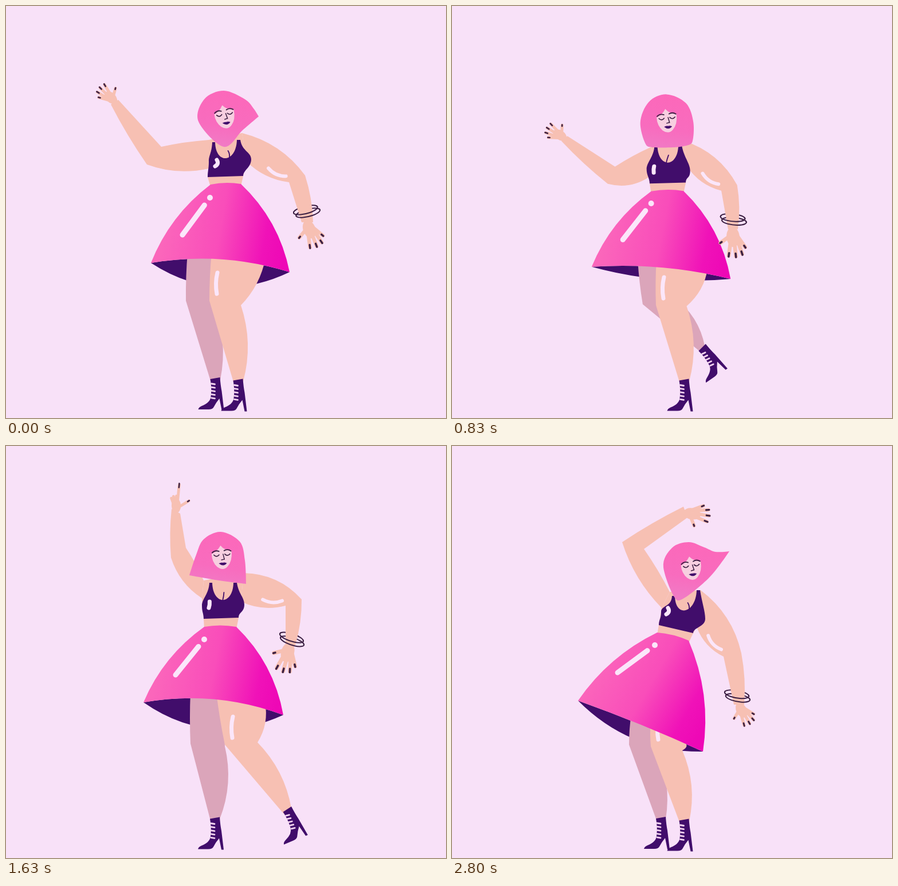
An HTML page with a canvas for the animation above (2.93 s loop, 768x720 px).

```html
<!DOCTYPE html>
<html lang="en">
<head>
<meta charset="utf-8">
<title>Dancer</title>
<style>
html, body { margin: 0; width: 100%; height: 100%; overflow: hidden; background: #f8e1f8; }
canvas { display: block; }
</style>
</head>
<body>
<canvas id="stage" width="768" height="720"></canvas>
<script>
const ctx = document.getElementById('stage').getContext('2d');
const LOOP = 2930, STEP = 100 / 3, LAST = 84;
const SKIN = '#f7c0b3', SHADE = '#dba5ba', DARK = '#410d6b', INK = '#3b1f42', SHINE = '#fbe6fa';

// Each row is one pose; poses are reached at these steps.
const keys = [0, 17, 34, 49, 62, 70, 83];

// waist L/R, hem L/R, hem bend, lining depth, shine start, shine dot
const skirtKeys = [
  [357,312, 410,311, 253,449, 495,465, 29, 68, 308,400, 356,335],
  [345,316, 400,315, 241,450, 484,468, 33, 48, 295,402, 344,338],
  [351,331, 409,331, 247,462, 489,486, 2, 0, 302,415, 352,352],
  [346,316, 402,316, 240,448, 484,470, 33, 70, 296,400, 346,338],
  [344,315, 399,313, 244,453, 488,463, 37, 72, 296,403, 344,338],
  [348,319, 402,323, 231,451, 466,498, 24, 58, 289,400, 346,341],
  [358,326, 413,340, 220,445, 438,534, 5, 50, 289,396, 354,348]];

// bottom L/R, strap L/R, bust L/R, facing
const topKeys = [
  [352,299, 414,297, 360,238, 409,234, 354,272, 428,268, 1],
  [340,303, 404,300, 348,236, 397,245, 331,276, 407,284, -1],
  [351,317, 413,317, 360,253, 406,241, 350,294, 426,290, .8],
  [345,302, 406,300, 355,239, 403,239, 342,279, 416,277, .2],
  [341,302, 402,299, 348,246, 394,236, 346,272, 416,268, 1],
  [346,306, 408,310, 361,240, 407,249, 339,282, 413,290, -1],
  [361,313, 421,327, 384,262, 433,252, 365,290, 442,302, 1]];

// Limbs: start, joint and end on one side, then end, joint and start on the other.
const armLeftKeys = [
  [354,284, 246,277, 183,172, 196,164, 271,246, 354,234],
  [336,296, 256,314, 182,236, 193,229, 275,284, 340,238],
  [352,301, 287,301, 213,235, 223,222, 299,271, 360,253],
  [342,266, 288,195, 289,110, 304,118, 314,178, 345,235],
  [340,268, 285,195, 280,92, 297,92, 307,160, 348,240],
  [345,266, 299,192, 324,85, 335,90, 333,165, 361,240],
  [366,283, 297,168, 404,106, 411,125, 335,180, 380,255]];
const armRightKeys = [
  [412,222, 522,296, 536,378, 516,378, 494,308, 420,272],
  [404,230, 496,316, 503,392, 486,392, 468,324, 402,272],
  [408,240, 502,305, 497,385, 480,385, 475,319, 420,290],
  [415,222, 516,268, 505,348, 488,348, 488,279, 410,272],
  [404,220, 525,268, 515,362, 496,362, 494,280, 411,272],
  [420,239, 506,322, 513,405, 496,405, 477,328, 410,290],
  [434,252, 505,362, 510,452, 492,452, 474,368, 427,316]];
const legBackKeys = [
  [375,430, 362,520, 374,653, 357,655, 314,515, 317,430],
  [375,430, 366,520, 378,653, 362,655, 316,513, 318,430],
  [395,465, 410,496, 515,527, 515,543, 352,531, 331,462],
  [380,430, 382,525, 373,652, 357,655, 322,520, 322,430],
  [380,430, 376,525, 373,652, 357,654, 317,515, 320,430],
  [380,450, 362,515, 371,642, 355,644, 305,505, 313,445],
  [365,480, 355,525, 373,652, 357,654, 309,522, 313,468]];
const legFrontKeys = [
  [453,440, 410,523, 414,656, 397,657, 355,515, 359,430],
  [452,444, 415,525, 414,656, 397,657, 361,520, 361,430],
  [440,474, 403,523, 414,656, 397,657, 350,525, 352,460],
  [452,448, 439,518, 498,633, 485,643, 382,522, 367,430],
  [452,448, 435,519, 480,615, 466,622, 375,520, 365,430],
  [442,480, 418,530, 413,656, 397,658, 370,525, 365,458],
  [403,515, 402,532, 414,656, 397,657, 347,525, 347,480]];

// left hand angle, size, pointing; right hand angle, size; bangles x, y, tilt
const handKeys = [
  [226, .78, 0, 70, .97, 525,359, -14],
  [222, .78, 0, 76, 1.08, 491,373, 6],
  [204, .74, 0, 97, .97, 492,373, 5],
  [269, .74, 1, 107, 1.03, 499,338, 18],
  [270, .82, 1, 104, .78, 507,343, 3],
  [283, .78, 1, 66, .84, 504,388, 4],
  [370, .9, 0, 62, .82, 498,437, 10]];

// back boot turn, front boot turn, front boot width
const bootKeys = [
  [0, 0, 1], [0, 0, 1], [-76, 0, 1], [0, -23, 1], [0, -19, 1], [0, 0, .6], [0, 0, 1]];

// nose x, y, tilt
const faceKeys = [
  [382,192, -8], [369,192, 0], [383,207, -8], [377,193, -2], [363,191, -10], [392,202, 10], [418,212, -6]];

// eight outline points clockwise from the crown, then roundness of the right and left lock
const hairKeys = [
  [380,148, 417,163, 432,179, 441,193, 413,217, 380,246, 336,202, 346,163, 0, 1],
  [368,148, 402,163, 415,195, 409,231, 378,250, 315,236, 320,200, 336,162, 1, 0],
  [382,162, 416,178, 429,210, 430,244, 405,241, 372,256, 339,210, 352,175, 0, 1],
  [375,150, 408,167, 417,200, 419,241, 372,235, 320,226, 332,190, 345,163, 0, 0],
  [363,150, 396,164, 406,195, 399,235, 352,244, 313,232, 320,190, 333,162, .3, 0],
  [394,156, 427,173, 437,205, 410,249, 364,244, 319,187, 344,185, 366,165, 1, 0],
  [413,168, 440,177, 460,185, 484,184, 447,232, 394,270, 369,212, 384,178, 0, .6]];

// Monotone cubic interpolation, so that held parts stay still.
function pose(rows, t) {
  t = Math.min(t, keys[keys.length - 1]);
  let i = 0;
  while (i < keys.length - 2 && t >= keys[i + 1]) i++;
  const span = keys[i + 1] - keys[i], u = (t - keys[i]) / span;
  return rows[i].map((a, c) => {
    const slope = j => rows[j + 1] && rows[j] ? (rows[j + 1][c] - rows[j][c]) / (keys[j + 1] - keys[j]) : 0;
    const tangent = j => {
      const p = slope(j - 1), q = slope(j);
      return p * q > 0 ? 2 * p * q / (p + q) : 0;
    };
    const b = rows[i + 1][c], e = u * u * (3 - 2 * u);
    return a + (b - a) * e + span * u * (1 - u) * ((1 - u) * tangent(i) - u * tangent(i + 1));
  });
}

const pairs = a => Array.from({ length: a.length >> 1 }, (_, i) => [a[2 * i], a[2 * i + 1]]);
const mix = (a, b, k) => [a[0] + (b[0] - a[0]) * k, a[1] + (b[1] - a[1]) * k];
const shift = (p, x, y) => [p[0] + x, p[1] + y];
const rad = deg => deg * Math.PI / 180;

function fill(color) { ctx.fillStyle = color; ctx.fill(); }

// Curve from a to b that bends to the left of its direction.
function bend(a, b, k) {
  const dx = b[0] - a[0], dy = b[1] - a[1], len = Math.hypot(dx, dy) || 1, m = mix(a, b, .5);
  ctx.quadraticCurveTo(m[0] + dy / len * k, m[1] - dx / len * k, ...b);
}

function begin(p) { ctx.beginPath(); ctx.moveTo(...p); }

function line(a, b, width, color, k = 0) {
  begin(a);
  bend(a, b, k);
  ctx.lineWidth = width;
  ctx.strokeStyle = color;
  ctx.stroke();
}

function limb(p, bends, color) {
  begin(p[0]);
  bend(p[0], p[1], bends[0]);
  bend(p[1], p[2], bends[1]);
  ctx.lineTo(...p[3]);
  bend(p[3], p[4], bends[2]);
  bend(p[4], p[5], bends[3]);
  fill(color);
}

function local(p, deg, sx, sy, draw) {
  ctx.save();
  ctx.translate(...p);
  ctx.rotate(rad(deg));
  ctx.scale(sx, sy);
  draw();
  ctx.restore();
}

const openHand = [[21,23], [44,11], [46,-1], [43,-12], [32,-18]];
const pointHand = [[24,31], [63,9], [36,2], [35,-5], [31,-10]];

function hand(p, deg, size, point) {
  local(p, deg, size, size, () => {
    ctx.beginPath();
    ctx.ellipse(13, 1, 17, 11, 0, 0, 7);
    fill(SKIN);
    openHand.forEach((open, i) => {
      const tip = mix(open, pointHand[i], point), root = [12, tip[1] * .35];
      line(root, tip, 6.5, SKIN);
      if (i < 2 || point < .5) line(mix(root, tip, .86), mix(root, tip, 1.05), 3.4, INK);
    });
  });
}

function boot(leg, deg, width) {
  local(shift(mix(leg[2], leg[3], .5), 0, -3), deg, width, 1, () => {
    ctx.fillStyle = DARK;
    ctx.fill(new Path2D('M-9 1L8-2Q9 12 11 22L15 55H11L7 35Q1 42-3 50Q-5 54-12 54H-30Q-29 50-24 48Q-9 42-8 32Q-6 17-9 1Z'));
    for (let y = 9; y < 36; y += 6.2) line([-7, y], [-1, y + 1], 2.8, '#f3d3ef');
  });
}

function bangles([x, y], tilt, from, to) {
  local([x, y], tilt, 1, 1, () => {
    ctx.strokeStyle = INK;
    ctx.lineWidth = 2;
    for (const s of [-1, 1]) {
      ctx.beginPath();
      ctx.ellipse(s * 1.5, s * 3, 21.5, 6.5, 0, from, to);
      ctx.stroke();
    }
  });
}

function hair(a) {
  const p = pairs(a.slice(0, 16)), n = p.length;
  const tangent = i => {
    const q = p[(i + 1) % n], r = p[(i + n - 1) % n];
    const k = (i === 3 ? a[16] : i === 5 ? a[17] : 1) / 6;
    return [(q[0] - r[0]) * k, (q[1] - r[1]) * k];
  };
  begin(p[0]);
  p.forEach((from, i) => {
    const j = (i + 1) % n, s = tangent(i), e = tangent(j);
    ctx.bezierCurveTo(...shift(from, ...s), ...shift(p[j], -e[0], -e[1]), ...p[j]);
  });
  const g = ctx.createLinearGradient(p[0][0], p[0][1], p[0][0] - 15, p[0][1] + 100);
  g.addColorStop(0, '#fc68ba');
  g.addColorStop(.6, '#f86cbe');
  g.addColorStop(1, '#f07cc6');
  fill(g);
}

function face([x, y, tilt]) {
  local([x, y], tilt, 1, 1, () => {
    ctx.fillStyle = '#f7cfe0';
    ctx.fill(new Path2D('M-2-19Q-8-9-18-5Q-18 9-9 18Q1 26 9 18Q18 9 17-9Q5-10-2-19Z'));
    line([-17, -7], [-5, -9], 1.8, INK, 4);
    line([4, -10], [16, -9], 1.8, INK, 4);
    line([-14, -3], [-5, -3], 1.7, INK, -5);
    line([5, -4], [14, -4], 1.7, INK, -5);
    line([2, -4], [4, 5], 1.5, INK);
    line([4, 5], [-1, 6], 1.5, INK);
    ctx.fillStyle = DARK;
    ctx.fill(new Path2D('M-6 12Q-2 10 1 11Q4 10 8 12Q2 19-6 12Z'));
  });
}

function draw(t) {
  const s = pose(skirtKeys, t), [wL, wR, hL, hR] = pairs(s.slice(0, 8));
  const top = pose(topKeys, t), [bL, bR, sL, sR, cL, cR] = pairs(top), facing = top[12];
  const [armL, armR, back, front] = [armLeftKeys, armRightKeys, legBackKeys, legFrontKeys].map(k => pairs(pose(k, t)));
  const h = pose(handKeys, t), bangle = [h[5], h[6]], boots = pose(bootKeys, t);

  ctx.fillStyle = '#f8e1f8';
  ctx.fillRect(0, 0, 768, 720);
  ctx.lineCap = 'round';

  // skirt lining and legs
  begin(hL);
  bend(hL, hR, s[8]);
  bend(hR, hL, s[9]);
  fill(DARK);
  limb(back, [0, 20, 0, 2], SHADE);
  boot(back, boots[0], 1);
  limb(front, [14, 20, 0, 2], SKIN);
  boot(front, boots[1], boots[2]);
  line(shift(front[4], 14, -49), shift(front[4], 13, -12), 7, SHINE, -4);

  // arms and body
  limb(armL, [16, 4, 0, 3], SKIN);
  bangles(bangle, h[7], Math.PI, 2 * Math.PI);
  limb(armR, [24, 6, 0, 14], SKIN);
  begin(armL[5]);
  for (const p of [armR[0], armR[5], bR, shift(wR, 0, 4), shift(wL, 0, 4), bL, armL[0]]) ctx.lineTo(...p);
  fill(SKIN);
  const elbow = armR[4], shoulder = armR[5];
  const len = Math.hypot(elbow[0] - shoulder[0], elbow[1] - shoulder[1]);
  line(shift(mix(elbow, shoulder, 40 / len), 0, -7), shift(mix(elbow, shoulder, 6 / len), 0, -8), 6, SHINE, -8);

  // top
  begin(sL);
  ctx.lineTo(...shift(sL, 5, 0));
  ctx.bezierCurveTo(...shift(sL, 6, 40), ...shift(sR, -7, 40), ...shift(sR, -6, 0));
  ctx.lineTo(...sR);
  ctx.bezierCurveTo(...shift(sR, 3, 20), ...shift(cR, 0, -13), ...cR);
  ctx.bezierCurveTo(...shift(cR, 0, 14), ...shift(bR, 0, -10), ...bR);
  ctx.lineTo(...bL);
  ctx.bezierCurveTo(...shift(bL, 0, -10), ...shift(cL, 0, 12), ...cL);
  ctx.bezierCurveTo(...shift(cL, 0, -12), ...shift(sL, -1, 20), ...sL);
  fill(DARK);
  const neck = mix(sL, sR, .5);
  line(shift(neck, 1 + 2 * facing, 17), shift(neck, 7 * facing - 2, 30), 1.8, DARK, 3 * facing);
  line(shift(bL, 9 + 7 * facing, -30), shift(bL, 8 + 5 * facing, -19), 7, SHINE, 6 * facing);

  // skirt
  begin(wL);
  bend(wL, wR, 5);
  bend(wR, hR, 28);
  bend(hR, hL, -s[8]);
  bend(hL, wL, 24);
  const g = ctx.createLinearGradient(hL[0] + 20, hL[1] - 40, hR[0] - 10, hR[1] - 20);
  g.addColorStop(0, '#fb66bb');
  g.addColorStop(.45, '#f94dba');
  g.addColorStop(.82, '#f012b8');
  g.addColorStop(1, '#ee08b6');
  fill(g);
  const dot = [s[12], s[13]], shine = [s[10], s[11]];
  line(shine, mix(shine, dot, .8), 9, SHINE);
  line(dot, dot, 10, SHINE);

  hand(mix(armL[2], armL[3], .5), h[0], h[1], h[2]);
  hand(mix(armR[2], armR[3], .5), h[3], h[4], 0);
  bangles(bangle, h[7], -.3, Math.PI + .3);
  hair(pose(hairKeys, t));
  face(pose(faceKeys, t));
}

function tick() {
  const time = performance.now() % LOOP;
  draw(Math.min(LAST, Math.floor((time + 4) / STEP)));
  requestAnimationFrame(tick);
}
tick();
</script>
</body>
</html>
```
